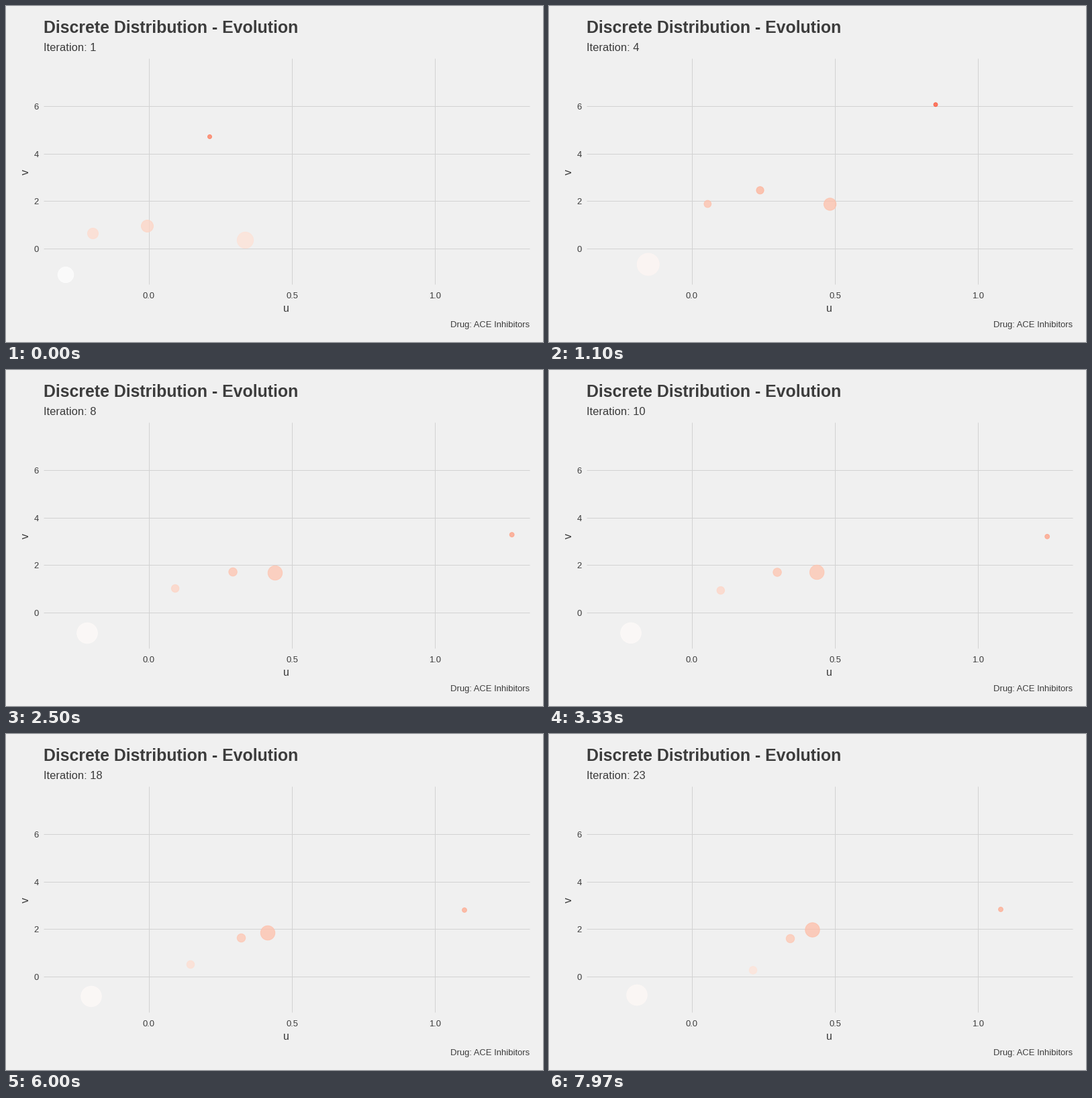
These frames come from a looping animation (800 px wide and 500 px high, 10 s). A matplotlib script:

```python
import matplotlib.pyplot as plt
import numpy as np
from matplotlib.animation import FuncAnimation
from matplotlib.patches import Circle

W, H, DPI = 800, 500, 100
LOOP_MS, FRAMES, MOVING = 10000, 300, 240
ITERATIONS = 23
INK, PAPER, GRID = "#3c3c3c", "#f0f0f0", "#d2d2d2"
PT = 72 / DPI
ALPHA = 0.72
V_LOW_Y, V_HIGH_Y = 399.0, 93.0   # pixel rows of the smallest and largest v

fig = plt.figure(figsize=(W / DPI, H / DPI), dpi=DPI, facecolor=PAPER)
ax = fig.add_axes([0, 0, 1, 1])
ax.set_xlim(0, W)
ax.set_ylim(H, 0)
ax.axis("off")


def label(x, y, text, size, **style):
    style = {"ha": "left", "va": "baseline", "color": INK, **style}
    return ax.text(x, y, text, fontsize=size * PT, family="Liberation Sans", **style)


def rule(xs, ys):
    ax.plot(xs, ys, color=GRID, lw=PT, solid_capstyle="butt", zorder=1)


def heat(y):
    """White-to-red ramp, perceptually even, keyed by height."""
    cool = np.clip((y - V_HIGH_Y) / (V_LOW_Y - V_HIGH_Y), 0, 1)
    return 1, cool ** 0.7, cool, ALPHA


def glide(t, times, keys):
    """Move through the keys, easing in and out of each one."""
    i = min(np.searchsorted(times, t, side="right"), len(keys) - 1)
    s = (t - times[i - 1]) / (times[i] - times[i - 1])
    s = np.clip(s, 0, 1)
    ease = s * s * (3 - 2 * s)
    a, b = np.array(keys[i - 1]), np.array(keys[i])
    return a + (b - a) * ease


class Dot:
    # start, burst, fall back, settle, drift, end
    TIMES = (1, 2.6, 5.6, 7.5, 17.6, ITERATIONS)

    def __init__(self, radii, *path):
        self.radii, self.path = radii, path
        self.patch = ax.add_patch(Circle((0, 0), 1, linewidth=PT, zorder=3))

    def move(self, t):
        x, y = glide(t, self.TIMES, self.path)
        self.patch.center = x, y
        self.patch.radius = glide(t, self.TIMES[:3], self.radii) - 0.5
        self.patch.set_color(heat(y))


# Panel
for u in (0, 0.5, 1):
    x = 213 + 426 * u
    rule([x, x], [78, 414])
    label(x, 435, f"{u:.1f}", 13, ha="center")
for v in (0, 2, 4, 6):
    y = round(361 - 35.3 * v)
    rule([56, 780], [y, y])
    label(49, y + 5, str(v), 13, ha="right")

label(56, 40, "Discrete Distribution - Evolution", 24.9, weight="bold")
counter = label(56, 67, "", 16.5)
label(417.5, 455, "u", 16, ha="center")
label(29.5, 247, "v", 16, ha="center", va="center", rotation=90)
label(780, 478, "Drug: ACE Inhibitors", 13, ha="right")

dots = [
    Dot((12.2, 18, 15.8), (89, 400), (178, 377), (113.5, 393),
        (121, 391.5), (127, 390.5), (131, 388.5)),
    Dot((8.5, 5.5, 6.2), (129.5, 338.5), (241.5, 272.5), (230.5, 319.5),
        (252, 325), (275, 343), (304, 351.5)),
    Dot((9.5, 5.5, 6.7), (210.5, 327.5), (318.5, 251.5), (310, 300),
        (338, 300.5), (350.5, 303.5), (359.5, 304.5)),
    Dot((12.6, 8.3, 11.2), (356.5, 348.5), (443.5, 279.5), (390.5, 312.5),
        (401, 302), (390, 296), (392.5, 291.5)),
    Dot((3.5, 3, 3.9), (303.5, 194.5), (538, 97), (619, 203),
        (754, 245), (683, 262), (673, 261)),
]


def update(frame):
    progress = min(frame, MOVING - 1) / (MOVING - 1)
    t = 1 + (ITERATIONS - 1) * progress
    counter.set_text(f"Iteration: {round(t)}")
    for dot in dots:
        dot.move(t)
    return [counter, *(dot.patch for dot in dots)]


anim = FuncAnimation(fig, update, frames=FRAMES, interval=LOOP_MS / FRAMES,
                     repeat=True, repeat_delay=0, blit=False)
plt.show()
```
